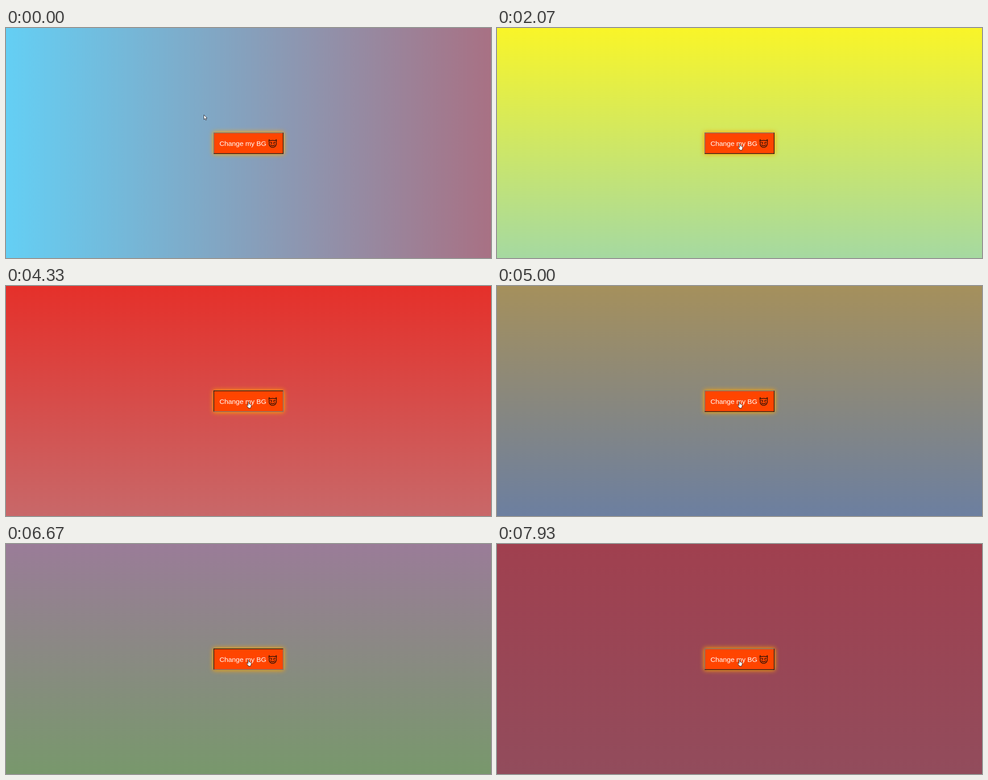
An HTML page for the animation above (8000 ms loop, 1087 px wide and 515 px high).

```html
<!DOCTYPE html>
<html lang="en">
<head>
<meta charset="utf-8">
<title>Background changer</title>
<style>
  html, body { margin: 0; width: 100%; height: 100%; overflow: hidden; }
  #stage { position: relative; width: 1087px; height: 515px; }
  #button {
    position: absolute; left: 465px; top: 234px; width: 157px; height: 48px;
    background: #ff4500; box-shadow: 0 0 10px 1px orange;
  }
  svg { position: absolute; left: 0; top: 0; }
  text { font: 15.36px "Liberation Sans", Arial, sans-serif; fill: #fff; }
  .edge { fill: none; stroke-width: 1.5; }
  #devil { fill: none; stroke: #2b1008; stroke-width: 1.6; stroke-linejoin: round; stroke-linecap: round; }
  #cursor path { fill: #fff; stroke: #1c1c24; stroke-width: .9; stroke-linejoin: round; }
</style>
</head>
<body>
<div id="stage">
  <div id="button"></div>
  <svg width="1087" height="515">
    <path id="topLeft" class="edge" d="M465.75 281.5V234.75H621.5"/>
    <path id="bottomRight" class="edge" d="M465.5 281.25H621.25V234.5"/>
    <text x="478.4" y="264">Change my BG</text>
    <g id="devil">
      <path d="M589.6 250Q591 252.2 593.6 252.3Q597.7 250.6 601.8 252.3Q604.4 252.2 605.8 250Q606.6 253.5 605.2 256.4A8 8 0 1 1 590.2 256.4Q588.8 253.5 589.6 250Z"/>
      <path d="M593 255.8L595.8 257.6M594.4 258.2V258.6M602.4 255.8L599.6 257.6M601 258.2V258.6M593.4 261.6Q597.7 266 602 261.6"/>
    </g>
    <g id="cursor">
      <path id="arrow" d="M.5 .5V10.9L3 8.6L4.6 12.4L6.4 11.6L4.8 7.9H8Z"/>
      <path id="hand" d="M3.4 9V1.8Q3.4 .6 4.4 .6T5.4 1.8V5.2Q6.6 4.6 7.2 5.6Q8.4 5.2 8.8 6.2Q10.4 6 10.4 7.6V10.4Q10.2 12 9.2 13.2V14.6H4.2V13.4L1 9.6Q.3 8.4 1.4 8Q2.4 7.8 3.4 9Z"/>
    </g>
  </svg>
</div>
<script>
const LOOP = 8000, LIGHT = '#767676', DARK = '#1c1c1c';
const $ = id => document.getElementById(id);

// press time, release time, top colour, bottom colour
const clicks = [
  [730, 870, '#6f9bb4', '#a6825f'],
  [1330, 1530, '#b06c9a', '#7f8f70'],
  [1930, 2070, '#f9f528', '#a5d9a1'],
  [2600, 2670, '#7fa583', '#9a6a86'],
  [3200, 3270, '#97a0e0', '#531329'],
  [3800, 3930, '#e5302a', '#c86869'],
  [4330, 4530, '#8a78b0', '#7aa08c'],
  [4930, 5000, '#a5905c', '#6c7fa0'],
  [5470, 5600, '#4cc291', '#e5b75c'],
  [6000, 6070, '#9a7c98', '#78986c'],
  [6670, 6730, '#ef4084', '#823551'],
  [7200, 7400, '#6d93a3', '#9c7272'],
  [7870, 7930, '#a0404f', '#924c5c']
];

// start time, x, y, shape
const moves = [
  [0, 443, 194, 'arrow'],
  [70, 470, 209, 'arrow'],
  [130, 504, 231, 'arrow'],
  [200, 530, 250, 'hand'],
  [270, 539, 259, 'hand'],
  [530, 540, 259, 'hand'],
  [2200, 539, 259, 'hand']
];

function draw(t) {
  const click = clicks.findLast(c => t >= c[1]);
  $('stage').style.background = click
    ? `linear-gradient(${click[2]}, ${click[3]})`
    : 'linear-gradient(to right, #64cff4, #a87184)';

  const pressed = clicks.some(c => t >= c[0] && t < c[1]);
  $('topLeft').style.stroke = pressed ? DARK : LIGHT;
  $('bottomRight').style.stroke = pressed ? LIGHT : DARK;

  const [, x, y, shape] = moves.findLast(m => t >= m[0]);
  $('cursor').setAttribute('transform', `translate(${x} ${y})`);
  for (const id of ['arrow', 'hand']) $(id).style.display = id === shape ? '' : 'none';
}

const start = performance.now();
function tick() {
  draw((performance.now() - start) % LOOP);
  requestAnimationFrame(tick);
}
tick();
</script>
</body>
</html>
```
